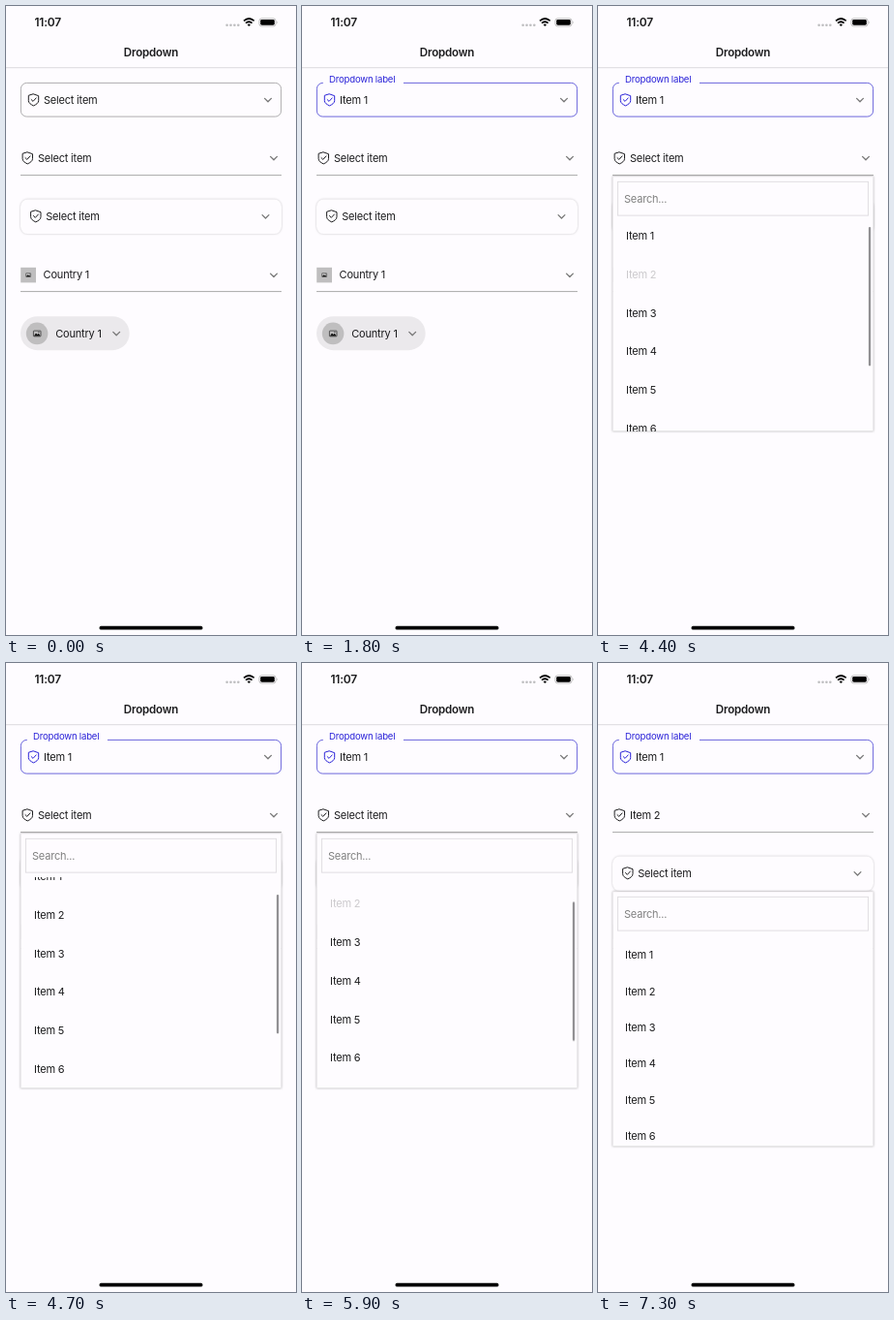
Animation of 300x649 px, one loop 8 s. Source, as an HTML page:

```html
<!DOCTYPE html>
<html lang="en">
<head>
<meta charset="utf-8">
<title>Dropdown</title>
<style>
html, body { margin: 0; width: 100%; height: 100%; overflow: hidden; background: #fefcff; }
svg { display: block; width: 300px; height: 649px; }
text { font: 11px Inter, "Liberation Sans", sans-serif; letter-spacing: -.2px; fill: #1c1c1e; }
.bold { font-weight: 600; }
.title { font-size: 11.6px; text-anchor: middle; }
.time { font-size: 12px; }
.label { font-size: 9.6px; fill: #2a22d8; }
.hint { fill: #808080; }
.line { stroke: #aaa; stroke-width: 1; }
.stroke { fill: none; stroke: currentColor; stroke-linecap: round; stroke-linejoin: round; }
.chevron { stroke: #777; stroke-width: 1.3; }
.card { fill: #fefcff; filter: drop-shadow(0 .8px 1.1px rgba(0,0,0,.22)); }
.sheet { fill: #fefcff; stroke: #e6e4e7; stroke-width: .6; filter: drop-shadow(0 .8px 1px rgba(0,0,0,.3)); }

/* One 8 s loop; 1% = 80 ms */
.border, .tint, .float, .empty1, .value1, .empty2, .value2, .panel, .list, .bar, .pressed {
  animation: 8s step-end infinite;
}
.border { animation-name: border; }
.tint { animation-name: tint; }
.float { animation-name: float; }
.empty1 { animation-name: empty1; }
.value1 { animation-name: value1; }
.empty2 { animation-name: empty2; }
.value2 { animation-name: value2; }
#p1 { animation-name: open1; }
#p2 { animation-name: open2; }
#p3 { animation-name: open3; }
#p1 .pressed { animation-name: press1; }
#p2 .pressed { animation-name: press2; }
#p2 .list { animation-name: scroll; }
#p2 .bar { animation-name: bar; }

@keyframes border { 0% { stroke: #a6a5a8; } 6.25%, 100% { stroke: #5c56d8; } }
@keyframes tint { 0% { color: #1c1c1e; } 6.25%, 100% { color: #2a22d8; } }
@keyframes float { 0% { visibility: hidden; } 6.25%, 100% { visibility: visible; } }
@keyframes empty1 { 0% { visibility: visible; } 22.5%, 100% { visibility: hidden; } }
@keyframes value1 { 0% { visibility: hidden; } 22.5%, 100% { visibility: visible; } }
@keyframes empty2 { 0% { visibility: visible; } 75%, 100% { visibility: hidden; } }
@keyframes value2 { 0% { visibility: hidden; } 75%, 100% { visibility: visible; } }
@keyframes open1 { 0%, 22.5%, 100% { visibility: hidden; } 7.5% { visibility: visible; } }
@keyframes open2 { 0%, 75%, 100% { visibility: hidden; } 43.75% { visibility: visible; } }
@keyframes open3 { 0% { visibility: hidden; } 91.25%, 100% { visibility: visible; } }
@keyframes press1 { 0%, 22.5%, 100% { opacity: 1; } 21.25% { opacity: .22; } }
@keyframes press2 { 0%, 57.5%, 75%, 100% { opacity: 1; } 55%, 73.75% { opacity: .22; } 56.25% { opacity: .6; } }
@keyframes scroll {
  0% { transform: translateY(0); }
  55% { transform: translateY(-5px); animation-timing-function: steps(3); }
  58.75% { transform: translateY(-22px); animation-timing-function: steps(4); }
  63.75%, 100% { transform: translateY(-33.5px); }
}
@keyframes bar {
  0% { opacity: 0; transform: translateY(0); }
  55% { opacity: 1; transform: translateY(0); animation-timing-function: steps(3); }
  58.75% { opacity: 1; transform: translateY(11px); animation-timing-function: steps(4); }
  63.75%, 100% { opacity: 1; transform: translateY(18.5px); }
}
</style>
</head>
<body>
<svg id="stage" viewBox="0 0 300 649">
  <defs>
    <g id="shield" class="stroke">
      <path d="M0-6.1 5.2-4.3V.6C5.2 3 2.7 4.7 0 5.9-2.7 4.7-5.2 3-5.2.6V-4.3Z"/>
      <path d="M-2.4-.5-.5 1.4 2.7-2.1"/>
    </g>
    <path id="chevron" class="stroke chevron" d="M-3.4-1.6 0 1.8 3.4-1.6"/>
    <g id="photo">
      <rect x="-3.8" y="-2.9" width="7.6" height="5.8" rx=".6" fill="none" stroke="#222" stroke-width=".7"/>
      <path d="M-3.3 2.5-1.2-.6.2 1 1.6-.3 3.3 2.5Z" fill="#111"/>
      <circle cx="1.7" cy="-1.5" r=".6" fill="#222"/>
    </g>
    <clipPath id="view"><rect x="15" y="46" width="270" height="217.2"/></clipPath>
  </defs>
  <rect width="300" height="649" fill="#fefcff"/>

  <!-- Status bar and header -->
  <text class="bold time" x="29.5" y="21.2">11:07</text>
  <g fill="#bdbdbf">
    <circle cx="228.6" cy="19.8" r="1.3"/><circle cx="232.5" cy="19.8" r="1.3"/>
    <circle cx="236.4" cy="19.8" r="1.3"/><circle cx="240.3" cy="19.8" r="1.3"/>
  </g>
  <g fill="none" stroke="#000" stroke-width="1.7">
    <path d="M246 15.3q5.3-4.6 10.6 0"/>
    <path d="M248 17.7q3.3-2.9 6.6 0"/>
  </g>
  <path d="M249.6 19.2q1.7-1.3 3.4 0l-1.7 1.8Z"/>
  <rect x="262" y="12.9" width="17" height="8" rx="2.4" fill="none" stroke="#aaa" stroke-width=".8"/>
  <rect x="263.2" y="14.1" width="14.6" height="5.6" rx="1.4"/>
  <path d="M280.2 15.5q1.4 1.4 0 2.8Z" fill="#aaa"/>
  <text class="bold title" x="150" y="52.4">Dropdown</text>
  <path d="M0 63.7H300" stroke="#dcdbde"/>

  <!-- Outlined field -->
  <rect class="border" x="15.4" y="79.4" width="269.2" height="34.7" rx="6" fill="none" stroke-width=".9"/>
  <g class="float">
    <rect x="22" y="70" width="83" height="13" fill="#fefcff"/>
    <text class="label" x="28" y="79">Dropdown label</text>
  </g>
  <g class="tint"><use href="#shield" x="28.5" y="97"/></g>
  <text class="empty1" x="39" y="100.7">Select item</text>
  <text class="value1" x="39" y="100.7">Item 1</text>
  <use href="#chevron" x="271" y="97"/>

  <!-- Underlined field -->
  <path class="line" d="M15 174.6H285"/>
  <g color="#1c1c1e"><use href="#shield" x="22.3" y="157"/></g>
  <text class="empty2" x="33" y="160.8">Select item</text>
  <text class="value2" x="33" y="160.8">Item 2</text>
  <use href="#chevron" x="277" y="157"/>

  <!-- Raised field -->
  <rect class="card" x="15" y="199.5" width="270" height="35.6" rx="7.5"/>
  <g color="#1c1c1e"><use href="#shield" x="30.8" y="217"/></g>
  <text x="41.2" y="221">Select item</text>
  <use href="#chevron" x="268.5" y="217.2"/>

  <!-- Country fields -->
  <path class="line" d="M15 294.6H285"/>
  <rect x="15.2" y="269.8" width="15.8" height="15.6" fill="#bfbebf"/>
  <use href="#photo" transform="translate(23.1 277.6) scale(.66)"/>
  <text x="38.6" y="281.2">Country 1</text>
  <use href="#chevron" x="277" y="277.7"/>
  <rect x="15" y="320.2" width="112.7" height="35" rx="17.5" fill="#ebe9ec"/>
  <circle cx="32.1" cy="337.9" r="11.3" fill="#bfbebf"/>
  <use href="#photo" x="32.2" y="338"/>
  <text x="51.2" y="341.6">Country 1</text>
  <use href="#chevron" x="114.2" y="338"/>

  <g id="panels"></g>
  <rect x="96.5" y="639.8" width="107" height="3.8" rx="1.9"/>
</svg>
<script>
// Dropdown sheet hanging at y = top; "pressed" is the item that gets tapped.
function panel(id, top, x, first, step, pressed) {
  let items = '';
  for (let i = 1; i <= 8; i++) {
    const cls = i === pressed ? ' class="pressed"' : '';
    items += `<text${cls} x="${x}" y="${first + (i - 1) * step + 4}">Item ${i}</text>`;
  }
  const bar = id === 'p2'
    ? '<rect class="bar" x="279.9" y="53" width="2.3" height="143.4" rx="1.1" fill="#929194"/>' : '';
  return `<g transform="translate(0 ${top})"><g id="${id}" class="panel">
    <rect class="sheet" x="15.2" y="1" width="269.6" height="262.4"/>
    <rect x="20.4" y="6.3" width="259.2" height="34.8" fill="none" stroke="#dddbde" stroke-width=".9"/>
    <text class="hint" x="27" y="28">Search...</text>
    <g clip-path="url(#view)"><g class="list">${items}</g></g>${bar}</g></g>`;
}

document.getElementById('panels').innerHTML =
  panel('p1', 115, 28, 66, 37.4, 1) +
  panel('p2', 175, 29, 67.2, 39.75, 2) +
  panel('p3', 235, 28, 66.2, 37.4, 0);
</script>
</body>
</html>
```
